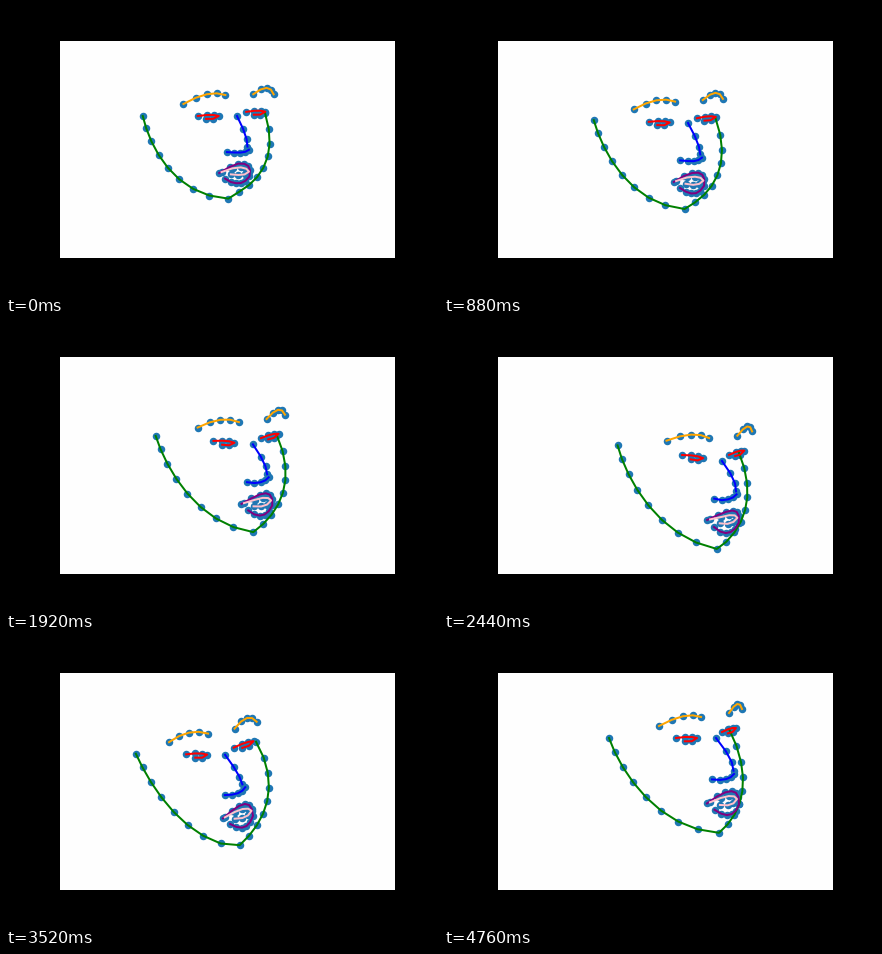
Write a matplotlib script that moves like this. It is 432 px wide and 288 px high and loops after 4.8 s.

```python
from math import comb

import numpy as np
import matplotlib.pyplot as plt
from matplotlib.animation import FuncAnimation
from matplotlib.patches import Rectangle

W, H, DPI = 432, 288, 72
STEP, COUNT = 40, 120


def bezier(count, *ctrl):
    """Points along a Bezier curve of any degree."""
    t = np.linspace(0, 1, count)[:, None]
    n = len(ctrl) - 1
    return sum(comb(n, i) * t**i * (1 - t)**(n - i) * np.array(c, float)
               for i, c in enumerate(ctrl))


def eye(start, end):
    """Six lid points: along the top, then back below."""
    t = np.array([0, 0.42, 0.75, 1, 0.75, 0.42])[:, None]
    pts = (1 - t) * np.array(start, float) + t * np.array(end, float)
    pts[:, 1] += [0, -1, -1, 0, 3, 3]
    return pts


def ring(top, bottom, left, right, over, under):
    """A lip contour: the top edge left to right, then the bottom edge back."""
    upper = bezier(top, left, over, right)
    lower = bezier(bottom + 2, right, under, left)[1:-1]
    return np.vstack([upper, lower])


# Head model around the top of the nose: x, y and the sideways shift
# that a full turn of the head adds.
CHIN = (6, 87, -3)
jaw = np.vstack([
    bezier(9, (-90, 0, -17), (-78, 32, -17), (-47, 84, -10), CHIN),
    bezier(9, CHIN, (34, 68, -6), (52, 36, -15), (31, -9, -18))[1:],
])
PARTS = [
    (jaw, "green"),
    (bezier(5, (-55, -12, -2), (-33, -27, 3), (-15, -21, 0)), "orange"),
    (bezier(5, (12, -25, 1), (27, -41, -4), (34, -29, -8)), "orange"),
    (bezier(4, (0, 0, 0), (13, 20, 5), (14.5, 30, 3)), "blue"),
    (bezier(5, (-4, 38, 0), (12, 40, 1), (17, 33, 1)), "blue"),
    (eye((-39, 0, -1), (-18, 0, -1)), "red"),
    (eye((9, -6, -3), (29, -10, -9)), "red"),
    (ring(7, 5, (-8, 60, -1), (22, 61, 1), (23, 37, 1), (13, 81, 2)), "purple"),
    (ring(5, 3, (-6, 59, 0), (21, 56, 0), (17, 49, 1), (15, 66, 1)), "pink"),
]
MODEL = np.vstack([pts for pts, _ in PARTS])
ENDS = np.cumsum([len(pts) for pts, _ in PARTS])

# ms, then the place of the top of the nose.
PATH = np.array([
    (0, 231, 110), (360, 240, 125), (560, 242, 120), (880, 244, 117),
    (1120, 227, 116), (1300, 220, 103), (1400, 219, 107), (1680, 231, 115),
    (2240, 269, 132.5), (2440, 278, 139), (2800, 272, 129), (3120, 231, 98),
    (3360, 221, 104.5), (3680, 218, 126), (3960, 217, 120), (4200, 229, 131),
    (4480, 266, 113), (4760, 272, 100),
])
# ms, turn, lean, roll, pitch, stretch.
ATTITUDE = np.array([
    (0, 0.25, -0.16, 0.10, 0.10, 0.95),
    (880, 0.25, -0.10, 0.085, 0.055, 0.99),
    (1400, 0, 0, 0, 0, 1),
    (2440, 0.85, -0.10, 0.065, -0.085, 1.02),
    (3120, -0.10, 0.09, 0, 0, 1.05),
    (3960, 0.10, 0.10, -0.10, -0.15, 1.07),
    (4760, 1, 0, 0, 0, 1.09),
])


def glide(keys, ms):
    """Smooth interpolation between keys without overshoot."""
    times, vals = keys[:, 0], keys[:, 1:]
    rate = np.diff(vals, axis=0) / np.diff(times)[:, None]
    a, b = rate[:-1], rate[1:]
    same = a * b > 0
    inner = np.where(same, 2 * a * b / np.where(same, a + b, 1), 0)
    slope = np.vstack([rate[:1], inner, rate[-1:]])

    i = min(np.searchsorted(times, ms, side="right") - 1, len(times) - 2)
    span = times[i + 1] - times[i]
    u = (ms - times[i]) / span
    return ((1 + 2 * u) * (1 - u)**2 * vals[i]
            + u * (1 - u)**2 * span * slope[i]
            + u * u * (3 - 2 * u) * vals[i + 1]
            + u * u * (u - 1) * span * slope[i + 1])


def landmarks(ms):
    turn, lean, roll, pitch, stretch = glide(ATTITUDE, ms)
    x, y, shift = MODEL.T
    x = x + turn * shift + lean * y
    y = np.where(y > 0, y * stretch, y) + roll * x + pitch * np.abs(x)
    return np.column_stack([x, y]) + glide(PATH, ms)


fig = plt.figure(figsize=(W / DPI, H / DPI), dpi=DPI, facecolor="black")
ax = fig.add_axes([0, 0, 1, 1])
ax.set_xlim(0, W)
ax.set_ylim(H, 0)
ax.axis("off")
ax.add_patch(Rectangle((54, 35), 335, 217, fc="#fefefe", ec="none", zorder=0))

dots = ax.scatter(*landmarks(0).T, s=36, color="tab:blue", linewidths=1.5, zorder=1)
lines = [ax.plot([], [], color=color, lw=2, zorder=2)[0] for _, color in PARTS]


def draw(n):
    pts = landmarks(n * STEP)
    dots.set_offsets(pts)
    for line, part in zip(lines, np.split(pts, ENDS[:-1])):
        line.set_data(*part.T)
    return [dots, *lines]


anim = FuncAnimation(fig, draw, frames=COUNT, interval=STEP, repeat=True)
plt.show()
```
